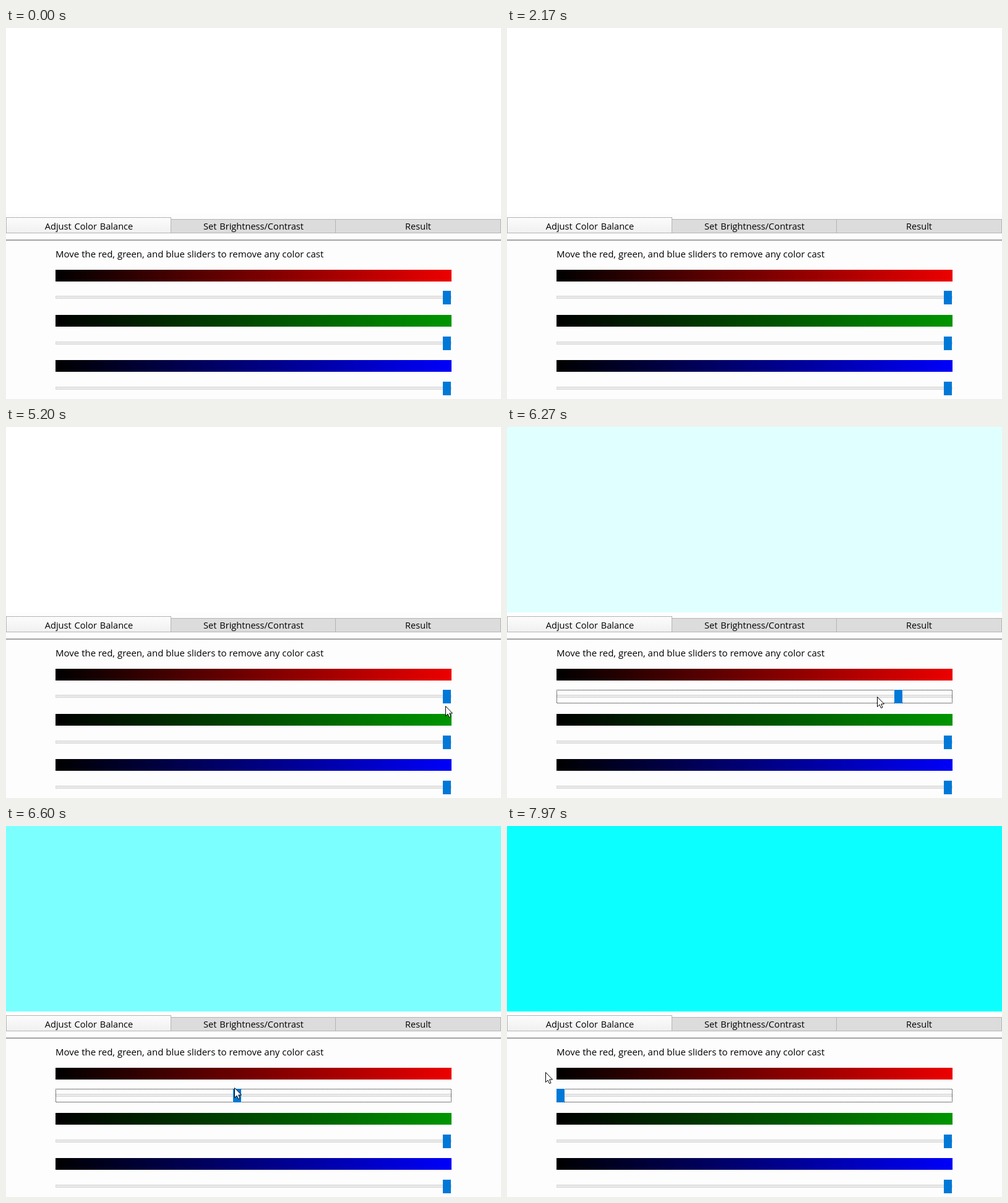
These frames come from a looping animation (800x600 px, 8 s). An HTML page:

```html
<!DOCTYPE html>
<html lang="en">
<head>
<meta charset="utf-8">
<title>Color balance</title>
<style>
  html, body { margin: 0; width: 100%; height: 100%; overflow: hidden; background: #fdfdfd; }
  svg { display: block; width: 800px; height: 600px; }
  text { font: 15px "Open Sans", "Noto Sans", sans-serif; fill: #000; }
  .tab text { font-size: 14.6px; word-spacing: 1px; text-anchor: middle; }
  .tab rect { stroke: #b4b4b4; }
  .track { fill: #e9e9e9; stroke: #d8d8d8; }
  .thumb { fill: #0078d7; }
</style>
</head>
<body>
<svg viewBox="0 0 800 600">
  <defs>
    <linearGradient id="activeTab" x2="0" y2="1">
      <stop stop-color="#fcfcfc"/><stop offset="1" stop-color="#f0f0f0"/>
    </linearGradient>
    <linearGradient id="red"><stop/><stop offset="1" stop-color="#ec0000"/></linearGradient>
    <linearGradient id="green"><stop/><stop offset="1" stop-color="#009600"/></linearGradient>
    <linearGradient id="blue"><stop/><stop offset="1" stop-color="#0000fa"/></linearGradient>
  </defs>

  <rect id="preview" width="800" height="300"/>

  <g class="tab" fill="#dcdcdc">
    <rect x="266.5" y="309.5" width="266" height="22"/>
    <rect x="532.5" y="309.5" width="267" height="22"/>
    <rect x=".5" y="306.5" width="266" height="25" fill="url(#activeTab)"/>
    <text x="134" y="326">Adjust Color Balance</text>
    <text x="400" y="326">Set Brightness/Contrast</text>
    <text x="666" y="326">Result</text>
  </g>
  <rect y="342" width="800" height="2" fill="#a4a4a8"/>
  <text x="80" y="371">Move the red, green, and blue sliders to remove any color cast</text>

  <g id="sliders"></g>
  <path id="cursor" d="M.5 .5V16.5L4 13 6.5 18.5 9 17.5 6.7 12H11.5Z" fill="#fff" stroke="#000"/>
</svg>

<script>
const LOOP = 8000, APPEAR = 4850, PRESS = 6050, LAG = 40, GRIP = 7;
const MIN_X = 80, MAX_X = 706;

const $ = id => document.getElementById(id);
const clamp = (v, lo, hi) => Math.min(hi, Math.max(lo, v));
const easeOut = k => k * (2 - k);
const smooth = k => k * k * (3 - 2 * k);

// Pointer gestures, each continuing from the end of the one before
const start = { x: 725, y: 600 };
const moves = [
  { from: APPEAR, until: 5300, x: 709, y: 443, ease: easeOut },
  { from: 6068, until: 6600, x: 369, y: 423, ease: smooth },
  { from: 6600, until: 7460, x: 234, y: 421, ease: smooth },
  { from: 7500, until: 7970, x: 62, y: 398, ease: smooth }
];

function pointerAt(t) {
  return moves.reduce((p, m) => {
    const k = m.ease(clamp((t - m.from) / (m.until - m.from), 0, 1));
    return { x: p.x + (m.x - p.x) * k, y: p.y + (m.y - p.y) * k };
  }, start);
}

$("sliders").innerHTML = ["red", "green", "blue"].map((name, i) => {
  const barY = 391 + 73 * i, thumbY = Math.round(425 + 73.5 * i);
  return `
    <rect x="80" y="${barY}" width="640" height="19" fill="url(#${name})"/>
    <rect class="track" x="80.5" y="${thumbY + 8.5}" width="639" height="4"/>
    <rect id="${name}Focus" x="80.5" y="${thumbY + .5}" width="639" height="21" visibility="hidden"
          fill="none" stroke="#000" stroke-dasharray="1" stroke-dashoffset=".5"/>
    <rect id="${name}Thumb" class="thumb" x="${MAX_X}" y="${thumbY}" width="13" height="22"/>`;
}).join("");

function draw() {
  const t = performance.now() % LOOP;
  const pressed = t >= PRESS;
  const pointer = pointerAt(t);
  const thumbX = pressed ? Math.round(clamp(pointerAt(t - LAG).x - GRIP, MIN_X, MAX_X)) : MAX_X;
  const level = (thumbX - MIN_X) / (MAX_X - MIN_X);

  $("redThumb").setAttribute("x", thumbX);
  $("preview").setAttribute("fill", `rgb(${Math.round(12 + 243 * level)},255,255)`);
  $("redFocus").style.visibility = pressed ? "visible" : "hidden";
  $("cursor").style.visibility = t < APPEAR ? "hidden" : "visible";
  $("cursor").setAttribute("transform", `translate(${Math.round(pointer.x)} ${Math.round(pointer.y)})`);
  requestAnimationFrame(draw);
}
draw();
</script>
</body>
</html>
```
